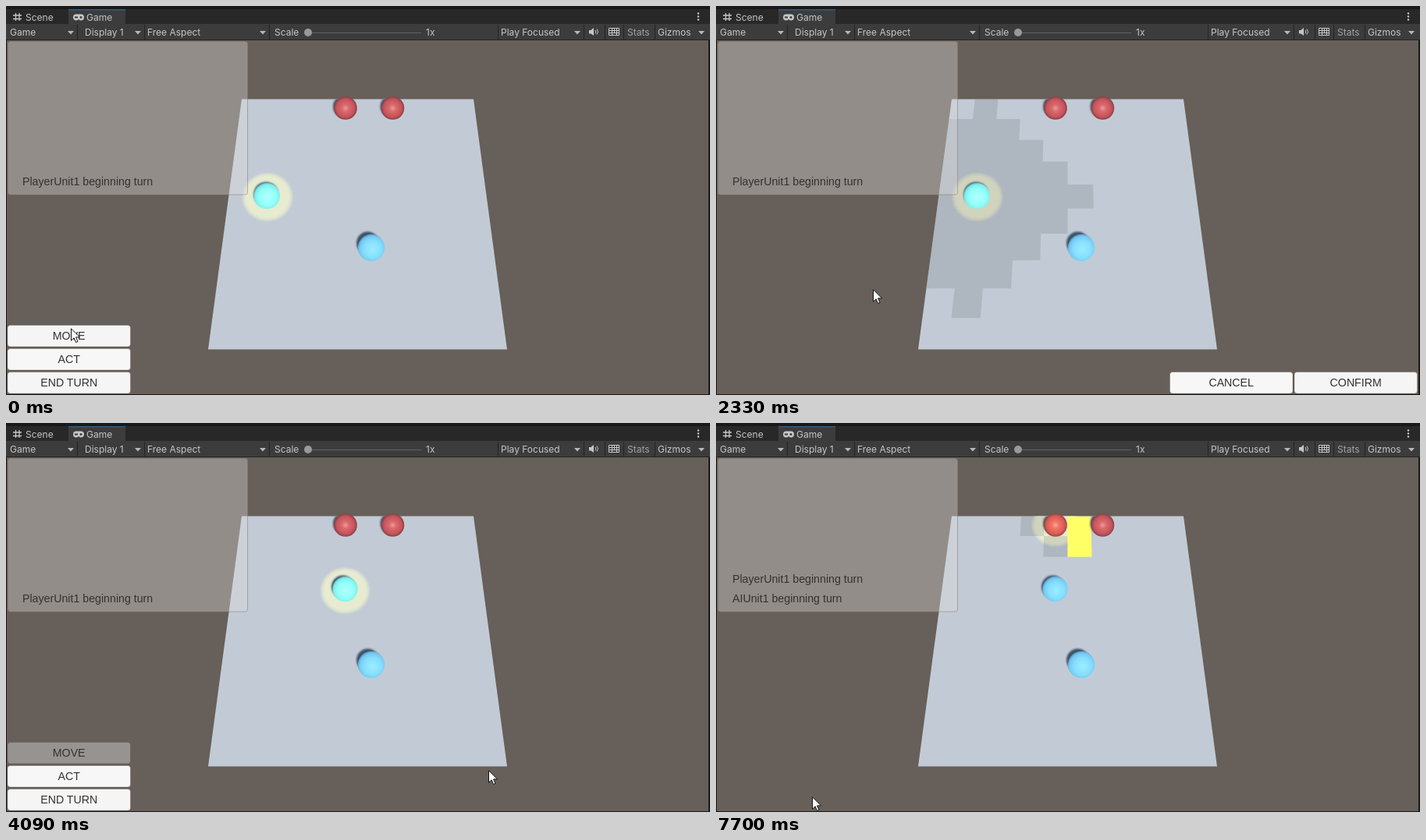
Recreate the animation shown at these times as an HTML page. Size 902x499 px, loop 8000 ms.

```html
<!DOCTYPE html>
<html lang="en">
<head>
<meta charset="utf-8">
<title>Turn-based board</title>
<style>
  html, body { margin: 0; width: 100%; height: 100%; overflow: hidden; background: #191919; }
  svg { display: block; width: 902px; height: 499px; }
  .bar text { font: 12px Inter, sans-serif; fill: #c6c6c6; }
  .ui text { font: 14.2px "Liberation Sans", Arial, sans-serif; fill: #323232; }
  .ui .label { text-anchor: middle; }
</style>
</head>
<body>
<svg id="stage" viewBox="0 0 902 499">
  <defs>
    <radialGradient id="halo">
      <stop offset=".8" stop-color="#e7ecd1"/>
      <stop offset=".9" stop-color="#e2e6d0" stop-opacity=".75"/>
      <stop offset="1" stop-color="#d8dcd2" stop-opacity="0"/>
    </radialGradient>
    <radialGradient id="blue" cx=".55" cy=".56" r=".58">
      <stop offset="0" stop-color="#9cecff"/><stop offset=".55" stop-color="#86dfff"/>
      <stop offset=".85" stop-color="#74c8f0"/><stop offset="1" stop-color="#548eb4"/>
    </radialGradient>
    <radialGradient id="lit" cx=".53" cy=".55" r=".57">
      <stop offset="0" stop-color="#b0fffc"/><stop offset=".55" stop-color="#94fffa"/>
      <stop offset=".85" stop-color="#7eeeea"/><stop offset="1" stop-color="#5a9fa4"/>
    </radialGradient>
    <radialGradient id="red" cx=".5" cy=".5" r=".52">
      <stop offset="0" stop-color="#f09a9a"/><stop offset=".3" stop-color="#d9696c"/>
      <stop offset=".75" stop-color="#c4545a"/><stop offset="1" stop-color="#813840"/>
    </radialGradient>
    <radialGradient id="redLit" cx=".5" cy=".5" r=".52">
      <stop offset="0" stop-color="#ffa58f"/><stop offset=".3" stop-color="#ee7468"/>
      <stop offset=".75" stop-color="#dc5a52"/><stop offset="1" stop-color="#8f3d3a"/>
    </radialGradient>
    <filter id="soft" x="-20%" y="-20%" width="140%" height="140%"><feGaussianBlur stdDeviation=".8"/></filter>
    <clipPath id="board"><path d="M302 119.5H599L642 440.5H259Z"/></clipPath>
  </defs>

  <g class="bar">
    <path fill="#282828" d="M0 4H902V23H0Z"/>
    <path fill="#3c3c3c" d="M80 4H153V23H80ZM0 23H902V43H0Z"/>
    <path fill="#2c5d87" d="M80 4H153V5.5H80Z"/>
    <path stroke="#232323" d="M91.5 24V43M177.5 24V43M337.5 24V43M630.5 24V43M740.5 24V43M767.5 24V43M791.5 24V43M831.5 24V43M0 43.5H902"/>
    <path stroke="#c6c6c6" stroke-width="1.3" d="M12.5 9V19M17 9V19M9 12H20M9 16.5H20"/>
    <path fill="#c6c6c6" fill-rule="evenodd" d="M90 10.5H96A4 4 0 0 1 96 18.5Q94.500 18.500 93 17Q91.500 18.500 90 18.500A4 4 0 0 1 90 10.500ZM88 13.500V15.500H92V13.500ZM94.500 14.500A1.300 1.300 0 0 0 97.500 14.500A1.300 1.300 0 0 0 94.500 14.500Z"/>
    <g fill="#c6c6c6">
      <circle cx="887" cy="9.500" r="1.200"/><circle cx="887" cy="13.500" r="1.200"/><circle cx="887" cy="17.500" r="1.200"/>
      <path d="M747 31H749.500L753 28V38L749.500 35.500H747Z"/>
    </g>
    <path fill="none" stroke="#c6c6c6" d="M755 31Q756.500 33 755 35.500M757 29.500Q760 33 757 36.500"/>
    <path fill="none" stroke="#c6c6c6" d="M772.500 28.500H785.500V37.500H772.500ZM773 31.500H785M773 34.500H785M776.500 29V37M779.500 29V34M782.500 29V37"/>
    <path stroke="#636363" d="M387 34.500H532"/>
    <circle cx="387" cy="34" r="5" fill="#999"/>
    <g id="arrows" fill="#b8b8b8"></g>
    <g id="barText"></g>
  </g>

  <path fill="#675f59" d="M1 44H900V498H1Z"/>
  <path fill="#c2cbd5" d="M302 119.500H599L642 440.500H259Z"/>
  <g clip-path="url(#board)">
    <ellipse id="glow" fill="url(#halo)"/>
    <g id="tiles"></g>
    <g id="shadows" fill="#3d526a" filter="url(#soft)"></g>
  </g>
  <g id="balls"></g>

  <g class="ui">
    <rect x="2.500" y="45.500" width="307" height="196.500" rx="3" fill="#dcdcdc" fill-opacity=".37" stroke="#8c7c74" stroke-opacity=".55"/>
    <text id="older" x="21" y="205">PlayerUnit1 beginning turn</text>
    <text id="newer" x="21" y="230"></text>
    <g id="buttons"></g>
  </g>
  <path id="cursor" fill="#fff" stroke="#111" d="M.5 .8V16.200L4.100 12.800L6.600 18.500L9 17.400L6.500 11.900H11.500Z"/>
</svg>

<script>
const LOOP = 8000;
const $ = id => document.getElementById(id);

function add(parent, tag, attrs, text = "") {
  const el = document.createElementNS("http://www.w3.org/2000/svg", tag);
  for (const key in attrs) el.setAttribute(key, attrs[key]);
  el.textContent = text;
  parent.append(el);
  return el;
}
const set = (el, attrs) => { for (const key in attrs) el.setAttribute(key, attrs[key]); };
const show = (el, on) => el.setAttribute("visibility", on ? "visible" : "hidden");

// Toolbar
[["Scene", 25, 19], ["Game", 103, 19], ["Game", 5, 38], ["Display 1", 101, 38],
 ["Free Aspect", 181, 38], ["Scale", 344, 38], ["1x", 538, 38],
 ["Play Focused", 634, 38], ["Stats", 796, 38], ["Gizmos", 835, 38]]
  .forEach(([text, x, y]) => add($("barText"), "text", { x, y, opacity: text === "Stats" ? .75 : 1 }, text));
[83, 169, 329, 732, 891].forEach(x => add($("arrows"), "path", { d: `M${x - 4} 32h8l-4 4.500z` }));

// Board of 10 x 10 cells in perspective
function corner(col, row) {
  const width = 1 / (1 / 297 + (1 / 383 - 1 / 297) * row / 10);
  return [450.5 + (col / 10 - .5) * width, 119.5 + 321 * (width - 297) / 86];
}
function tileGroup(cells, from, to, fill) {
  const group = add($("tiles"), "g", { fill });
  cells.forEach(([c, r]) => add(group, "polygon", {
    points: [corner(c, r), corner(c + 1, r), corner(c + 1, r + 1), corner(c, r + 1)].join(" ")
  }));
  return { group, from, to };
}
function diamond(col, row, reach) {
  const cells = [];
  for (let r = 0; r < 10; r++)
    for (let c = 0; c < 10; c++)
      if (Math.abs(c - col) + Math.abs(r - row) <= reach) cells.push([c, r]);
  return cells;
}
const SHADE = "rgba(0,0,0,.1)", YELLOW = "#ffff66";
const MOVED = 2680, TURN = 4840;
const tileGroups = [
  tileGroup(diamond(1, 4, 4), 1960, MOVED, SHADE),
  tileGroup([[3, 0], [5, 0], [4, 1]], 5360, LOOP, SHADE),
  tileGroup([[4, 0]], 5360, 6270, SHADE),
  tileGroup([[3, 0], [3, 1]], 7210, 7700, YELLOW),
  tileGroup([[5, 0], [5, 1]], 7700, LOOP, YELLOW)
];

// Units
function ball(x, y, r, fill, dx, dy, shadowR) {
  const shadow = add($("shadows"), "circle", { cx: x + dx, cy: y + dy, r: shadowR });
  return { shadow, body: add($("balls"), "circle", { cx: x, cy: y, r, fill }) };
}
const enemy = ball(435, 131, 14.8, "url(#red)", -2, -2, 14);
ball(495.5, 131, 14.8, "url(#red)", -2, -2, 14);
const start = ball(334.2, 243.5, 16.8, "url(#lit)", -1, -2, 15.8);
const moved = ball(434.5, 213, 16.2, "url(#lit)", -3, -3, 14.5);
ball(468, 310, 17.2, "url(#blue)", -4.500, -6, 14.5);

// Buttons
function button(label, x, y) {
  const group = add($("buttons"), "g", {});
  const face = add(group, "rect", { x, y, width: 157.5, height: 27.5, rx: 3.5, stroke: "#4a4440", "stroke-opacity": .3 });
  add(group, "text", { class: "label", x: x + 78.7, y: y + 18.7 }, label);
  return { group, face };
}
const move = button("MOVE", 2, 409.5), act = button("ACT", 2, 439.5), end = button("END TURN", 2, 469.5);
const cancel = button("CANCEL", 581.5, 469.5), confirm = button("CONFIRM", 741, 469.5);

// Cursor legs: start, end, from, control, to
const legs = [
  [590, 1150, [83, 413], [94, 419], [104, 425]],
  [2100, 2750, [104, 425], [271, 318], [438, 210]],
  [2960, 3460, [438, 210], [619, 345], [800, 479]],
  [3890, 4480, [800, 479], [462, 393], [123, 479]]
];
function cursorAt(t) {
  const leg = legs.findLast(l => t >= l[0]) || legs[0];
  const [from, to, a, b, c] = leg;
  const u = Math.min(1, Math.max(0, (t - from) / (to - from)));
  const k = u * u * (3 - 2 * u);
  return [0, 1].map(i => Math.round((1 - k) ** 2 * a[i] + 2 * k * (1 - k) * b[i] + k * k * c[i]));
}

function draw(t) {
  const hasMoved = t >= MOVED, enemyTurn = t >= TURN;
  const choosing = t >= 1960 && t < 3690;

  const [gx, gy, rx, ry] = enemyTurn ? [435, 131, 32, 29] : hasMoved ? [434.5, 215, 33, 31] : [335, 245, 34, 32.5];
  set($("glow"), { cx: gx, cy: gy, rx, ry });
  tileGroups.forEach(({ group, from, to }) => show(group, t >= from && t < to));

  [start.body, start.shadow].forEach(el => show(el, !hasMoved));
  [moved.body, moved.shadow].forEach(el => show(el, hasMoved));
  set(moved.body, { fill: enemyTurn ? "url(#blue)" : "url(#lit)" });
  set(enemy.body, { fill: enemyTurn ? "url(#redLit)" : "url(#red)" });

  show($("older"), enemyTurn);
  $("newer").textContent = enemyTurn ? "AIUnit1 beginning turn" : "PlayerUnit1 beginning turn";

  [move, act, end].forEach(b => show(b.group, !choosing && !enemyTurn));
  [cancel, confirm].forEach(b => show(b.group, choosing));
  const spent = t >= 3690;
  set(move.face, { fill: spent ? "#c8c8c8" : t >= 1900 ? "#c0c0c0" : "#f5f5f5", "fill-opacity": spent ? .5 : 1 });
  set(act.face, { fill: "#f7f7f7" });
  set(end.face, { fill: t >= 4680 ? "#ebebeb" : "#f5f5f5" });
  set(cancel.face, { fill: "#f7f7f7" });
  set(confirm.face, { fill: t >= 3640 ? "#d5d5d5" : "#f5f5f5" });

  set($("cursor"), { transform: `translate(${cursorAt(t)})` });
}

const began = performance.now();
function tick() {
  draw((performance.now() - began) % LOOP);
  requestAnimationFrame(tick);
}
draw(0);
requestAnimationFrame(tick);
</script>
</body>
</html>
```
